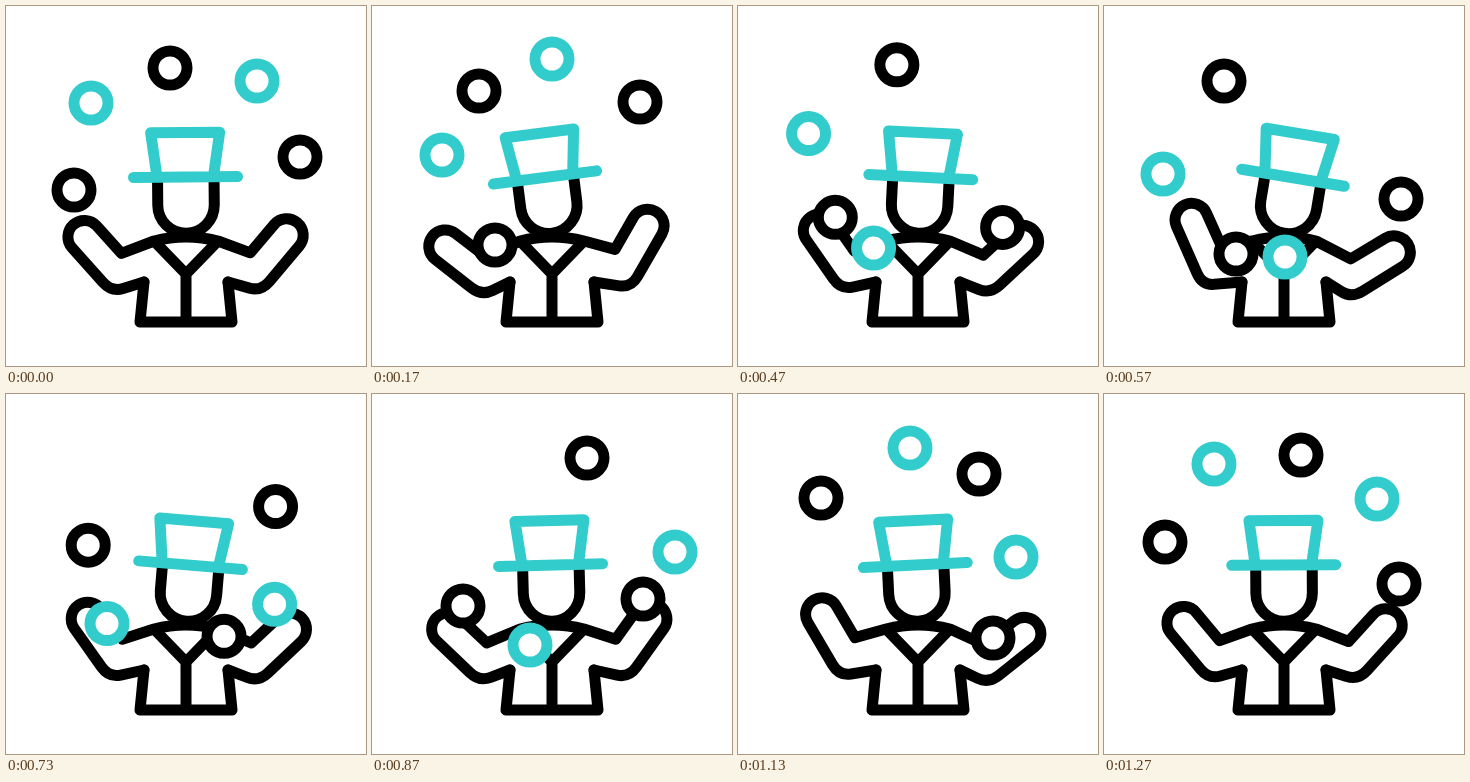
Write an HTML page that moves like this. It is 360 px wide and 360 px high and loops after 1300 ms.

```html
<!DOCTYPE html>
<html lang="en">
<head>
<meta charset="utf-8">
<title>Juggler</title>
<style>
  html, body { margin: 0; height: 100%; overflow: hidden; background: #fff; }
  svg { display: block; width: 100vw; height: 100vh; }
  svg * { stroke-width: 11; stroke-linecap: round; stroke-linejoin: round; }
</style>
</head>
<body>
<svg id="stage" viewBox="0 0 360 360" fill="none" stroke="#000">
  <path id="torso"/>
  <path d="M138 276L134 316H226L222 276M149 236L180 268L211 236M180 268V316"/>
  <g id="head">
    <path d="M152 174V199a28 28 0 0 0 56.500 0V174"/>
    <path stroke="#33cccc" d="M128 171H232M151 167L145.500 126.500H214.500L208.500 167"/>
  </g>
</svg>
<script>
const STEP = 1300 / 39;   // the picture advances 39 times per loop
const PERIOD = 40.65;     // full cycle in steps; the loop cuts it slightly short
const KEYS = [0, 5, 11, 17, 26, 34, 38];

const balls = [
  { color: '#000', x: [68, 123, 217, 297, 215, 83, 61], y: [184, 239, 240, 193, 64, 104, 148] },
  { color: '#000', x: [164, 107, 77, 132, 271, 241, 197], y: [62, 85, 164, 248, 205, 80, 61] },
  { color: '#000', x: [294, 268, 202, 120, 91, 255, 295], y: [151, 96, 57, 75, 212, 244, 190] },
  { color: '#33cccc', x: [85, 70, 97, 181, 303, 172, 110], y: [97, 149, 219, 251, 158, 54, 70] },
  { color: '#33cccc', x: [251, 180, 98, 59, 158, 278, 273], y: [75, 53, 90, 168, 251, 163, 105] },
];
const headTilt = [-0.5, -7.3, -4.4, 9.4, -1.5, -2.8, -0.3];
const armDrop = [0.64, 0.98, 0.84, 0.03, 0.79, 0.26, 0.57];

const stage = document.getElementById('stage');
const torso = document.getElementById('torso');
const head = document.getElementById('head');

for (const ball of balls) {
  ball.el = document.createElementNS('http://www.w3.org/2000/svg', 'circle');
  ball.el.setAttribute('r', 17);
  ball.el.setAttribute('fill', '#fff');
  ball.el.setAttribute('stroke', ball.color);
  stage.append(ball.el);
}

// Smooth cyclic curve through the values of a track
function sample(track, time) {
  const n = KEYS.length;
  const wrap = i => (i + n) % n;
  const key = i => KEYS[wrap(i)] + Math.floor(i / n) * PERIOD;
  const slope = i => (track[wrap(i + 1)] - track[wrap(i)]) / (key(i + 1) - key(i));
  const tangent = i => {
    const before = key(i) - key(i - 1), after = key(i + 1) - key(i);
    return (after * slope(i - 1) + before * slope(i)) / (before + after);
  };
  const i = KEYS.findLastIndex(k => k <= time);
  const h = key(i + 1) - key(i), s = (time - key(i)) / h, r = 1 - s;
  return r * r * (1 + 2 * s) * track[i] + s * s * (1 + 2 * r) * track[wrap(i + 1)]
    + h * s * r * (r * tangent(i) - s * tangent(i + 1));
}

// Points of the left arm; drop 0 is raised, 1 is lowered
function arm(drop) {
  const hand = [88 - 15 * drop, 213 + 28 * drop];
  const elbow = [98 + 12 * drop, 279 + 11 * drop];
  const crook = [118 - 4 * drop, 241 + 10 * drop];
  const dx = (elbow[0] + crook[0]) / 2 - hand[0];
  const dy = (elbow[1] + crook[1]) / 2 - hand[1];
  const k = 16.5 / Math.hypot(dx, dy);
  const inner = [hand[0] + dy * k, hand[1] - dx * k];
  const outer = [hand[0] - dy * k, hand[1] + dx * k];
  const armpit = [138, 276];
  const toward = (a, b, d) => {
    const f = d / Math.hypot(b[0] - a[0], b[1] - a[1]);
    return [a[0] + (b[0] - a[0]) * f, a[1] + (b[1] - a[1]) * f];
  };
  return { crook, inner, outer, elbow, armpit,
    bendIn: toward(elbow, outer, 13), bendOut: toward(elbow, armpit, 12) };
}

function armPath(drop, mirrored) {
  const p = arm(drop);
  const at = ([x, y]) => `${mirrored ? 360 - x : x} ${y}`;
  return `M${mirrored ? 212 : 148} 235L${at(p.crook)}L${at(p.inner)}`
    + `A16.5 16.5 0 0 ${mirrored ? 1 : 0} ${at(p.outer)}L${at(p.bendIn)}`
    + `Q${at(p.elbow)} ${at(p.bendOut)}L${at(p.armpit)}`;
}

function draw(now) {
  const time = Math.floor((now % 1300 + 4) / STEP) % 39;
  const drop = sample(armDrop, time);
  torso.setAttribute('d', 'M148 235Q180 227 212 235' + armPath(drop, false) + armPath(1.22 - drop, true));
  head.setAttribute('transform', `rotate(${sample(headTilt, time)} 180 226)`);
  for (const { el, x, y } of balls) {
    el.setAttribute('cx', sample(x, time));
    el.setAttribute('cy', sample(y, time));
  }
}

const start = performance.now();
function tick() {
  draw(performance.now() - start);
  requestAnimationFrame(tick);
}
tick();
</script>
</body>
</html>
```
